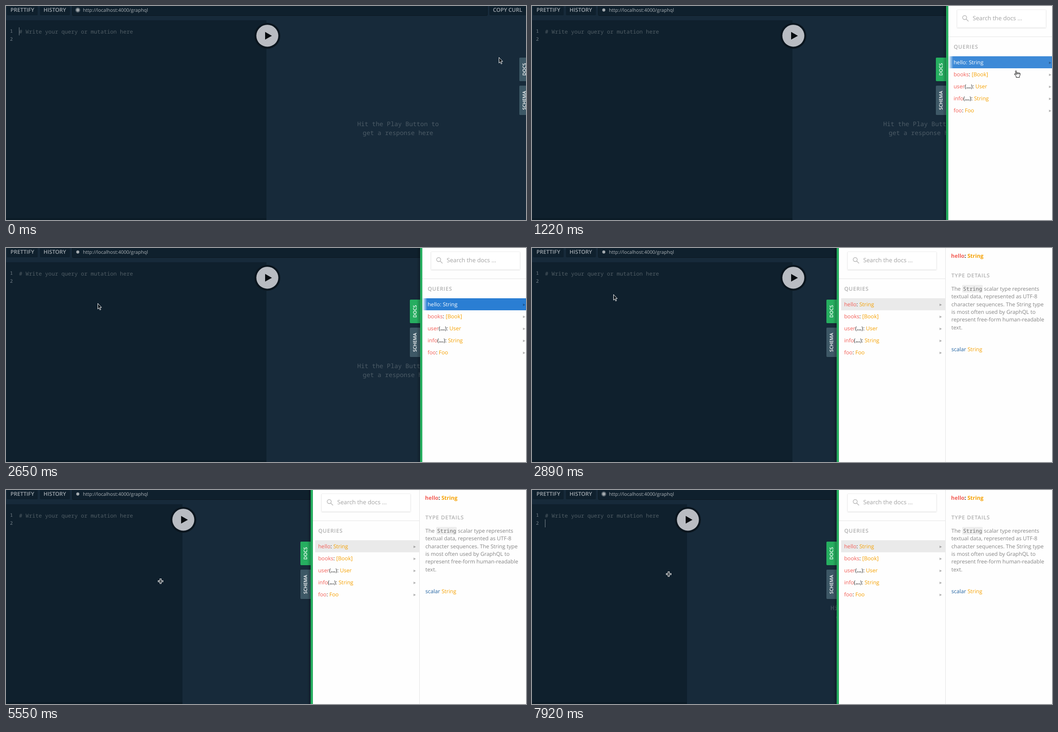
Recreate the animation shown at these times as an HTML page. Size 1164 by 481 pixels, loop 8 s.

```html
<!DOCTYPE html>
<html lang="en">
<head>
<meta charset="utf-8">
<title>Query playground</title>
<style>
  html, body { margin: 0; width: 100%; height: 100%; overflow: hidden; background: #172a3a; }
  svg { display: block; width: 1164px; height: 481px; font: 12.1px "Open Sans", sans-serif; text-rendering: geometricPrecision; }
  text { white-space: pre; }
  .button { font-weight: 600; fill: #a2a9b0; }
  .mono { font-family: "Noto Sans Mono", monospace; }
  .tab { font-size: 10.5px; font-weight: 600; fill: #fff; text-anchor: middle; }
  .heading { font-size: 12px; font-weight: 600; letter-spacing: .75px; fill: #b0b0b0; }
  .field { fill: #f25c54; }
  .type { fill: #f5a000; }
  .mark { fill: #222; }
  .active tspan { fill: #fff; }
</style>
</head>
<body>
<svg viewBox="0 0 1164 481">
  <defs>
    <linearGradient id="blue">
      <stop offset="0" stop-color="#2a7ed3" stop-opacity="0"/>
      <stop offset=".045" stop-color="#2a7ed3"/>
    </linearGradient>
    <linearGradient id="shade">
      <stop offset="0" stop-opacity="0"/>
      <stop offset="1" stop-opacity=".25"/>
    </linearGradient>
    <filter id="shadow" x="-20%" y="-20%" width="140%" height="150%">
      <feDropShadow dx="0" dy="1" stdDeviation="1" flood-opacity=".1"/>
    </filter>
  </defs>

  <rect width="1164" height="481" fill="#172a3a"/>
  <g fill="#0f202d">
    <rect x="2" y="-5" width="69" height="26" rx="2"/>
    <rect x="76" y="-5" width="67" height="26" rx="2"/>
    <rect x="1082" y="-5" width="90" height="26" rx="2"/>
    <rect x="148.5" y="-5" width="929" height="26.5" rx="2" stroke="#0a1720"/>
    <rect id="editor" y="32" height="449"/>
  </g>
  <rect id="footer" y="477" height="4" fill="#0b1924" opacity=".7"/>
  <text class="button" x="10" y="13.1">PRETTIFY</text>
  <text class="button" x="84" y="13.1">HISTORY</text>
  <text class="button" x="1090" y="13.1">COPY CURL</text>
  <circle id="ring" cx="160.7" cy="9" r="5.7" fill="#4c5963"/>
  <circle cx="160.7" cy="9" r="3.4" fill="#a3a9ae"/>
  <text x="172.2" y="13.2" font-size="10.7" fill="#adb3b8">http://localhost:4000/graphql</text>

  <g class="mono">
    <text x="9" y="60.3" font-size="10.4" fill="#77838b">1</text>
    <text x="9" y="77.8" font-size="10.4" fill="#77838b">2</text>
    <text x="29.3" y="61.6" font-size="12.15" fill="#505d65"># Write your query or mutation here</text>
    <g id="hint" font-size="13.85" text-anchor="middle" fill="#4c5b66">
      <text y="269.8">Hit the Play Button to</text>
      <text y="289.5">get a response here</text>
    </g>
  </g>
  <rect id="caret" x="29" width="1" height="18" fill="#7f8990"/>

  <g id="play">
    <circle cy="67" r="29" fill="#0a151e"/>
    <circle cy="66.8" r="24.6" fill="#b9bcc2"/>
    <path d="M-5 58.3L10.2 66.9L-5 75.5Z" fill="#070b0f"/>
  </g>

  <g id="panel">
    <g filter="url(#shadow)">
      <rect id="docsTab" x="-23" y="116" width="25" height="53" rx="2"/>
      <rect x="-23" y="179" width="25" height="66" rx="2" fill="#3d5866"/>
    </g>
    <text class="tab" transform="translate(-7.6 142.3) rotate(-90)">DOCS</text>
    <text class="tab" transform="translate(-7.6 212.2) rotate(-90)">SCHEMA</text>
    <rect x="-8" width="8" height="481" fill="url(#shade)"/>
    <rect width="500" height="481" fill="#fefefe"/>
    <rect width="5" height="481" fill="#27ae60"/>

    <g transform="translate(-.5 0)">
      <rect x="25" y="8.5" width="199" height="40" rx="1" fill="#fff" stroke="#eee" filter="url(#shadow)"/>
      <g fill="none" stroke="#b4b4b4" stroke-width="1.4">
        <circle cx="42" cy="26" r="4.5"/>
        <path d="M45.3 29.3L50.5 34.5"/>
      </g>
      <text x="60" y="32.4" font-size="13.15" fill="#a2a2a2">Search the docs ...</text>
      <path d="M5.5 69H244M244 0V481" stroke="#e4e4e4"/>
      <text class="heading" x="17.4" y="95.6">QUERIES</text>
      <rect id="selected" x="10.5" y="113" width="233" height="27" fill="#eaeaea"/>
      <rect id="hover" x="5.5" width="239" height="27" fill="url(#blue)"/>
      <g id="rows"></g>

      <text x="256.6" y="22" font-weight="700"><tspan class="field">hello</tspan><tspan class="mark">: </tspan><tspan class="type">String</tspan></text>
      <text class="heading" x="257.3" y="65.6">TYPE DETAILS</text>
      <rect x="281.5" y="83" width="46" height="17" rx="2" fill="#eee"/>
      <g id="details" fill="#858585" font-size="12.05">
        <text class="mono" x="283.5" y="96" font-size="11.8" fill="#707070">String</text>
        <text x="330" y="96">scalar type represents</text>
      </g>
      <text x="257.3" y="232"><tspan fill="#1f61a0">scalar </tspan><tspan class="type">String</tspan></text>
    </g>
  </g>

  <g id="pointer" stroke-linejoin="round">
    <path id="arrow" d="M.5 .5V13.2L3.3 10.5L5.2 15.2L7.2 14.4L5.3 9.7H9Z" fill="#0c141a" stroke="#fff"/>
    <path id="hand" d="M-2.6 2V-6.2Q-2.6-7.6-3.7-7.6T-4.8-6.2V1L-6.2-.6Q-7.4-1-6.8.6L-3.2 5V7.5H4.2V5.2Q6 2.5 5.8-1.6Q5.2-3 3.8-2.1Q3-3.3 1.6-2.6Q.6-3.6-.6-2.9L-2.6-3M-.6-2.9V.5M1.6-2.6V.5M3.8-2.1V.5" fill="#fff" stroke="#111"/>
    <g id="cross" fill="none">
      <path d="M-6 0H6M0-6V6" stroke="#fff" stroke-width="4"/>
      <path d="M-5.2 0H5.2M0-5.2V5.2" stroke="#0c141a" stroke-width="1.7"/>
    </g>
  </g>
</svg>
<script>
const $ = id => document.getElementById(id);
const set = (id, attrs) => Object.entries(attrs).forEach(([key, value]) => $(id).setAttribute(key, value));
const show = (id, visible) => set(id, { visibility: visible ? "visible" : "hidden" });
const move = (id, x, y = 0) => set(id, { transform: `translate(${x} ${y})` });
const clamp = (value, low, high) => Math.min(high, Math.max(low, value));

const LOOP = 8000;
const OPEN = 1220;    // docs panel slides in
const DETAILS = 2890; // second column appears
const RESIZE = 4000;  // pointer reaches the divider
const DRAG = 4860;    // divider starts to move

// Key points of the pointer path: time, x, y.
const path = [
  [0, 1103, 115], [630, 1154, 146], [930, 1153, 145], [OPEN, 1087, 153],
  [2080, 1022, 141], [2650, 205, 124], [DETAILS, 182, 104], [3520, 644, 246],
  [RESIZE, 580, 217], [DRAG, 577, 212], [5520, 346, 205], [LOOP - 80, 306, 189]
];

function pointerAt(time) {
  const i = path.findLastIndex(([start]) => start <= time);
  const [t0, x0, y0] = path[i];
  const [t1, x1, y1] = path[i + 1] ?? [LOOP, x0, y0];
  const jumps = Math.max(1, Math.round((t1 - t0) / 270));
  const part = Math.floor((time - t0) / (t1 - t0) * jumps) / jumps;
  return [x0 + (x1 - x0) * part, y0 + (y1 - y0) * part];
}

const dots = '(<tspan font-weight="700">...</tspan>)';
$("rows").innerHTML = [
  ["hello", "", "String"], ["books", "", "[Book]"], ["user", dots, "User"],
  ["info", dots, "String"], ["foo", "", "Foo"]
].map(([name, args, type], i) => {
  const y = 131 + 27 * i;
  return `<g><text x="17.2" y="${y}"><tspan class="field">${name}</tspan><tspan class="mark">${args}: </tspan><tspan class="type">${type}</tspan></text>
    <path d="M230.8 ${y - 6}L236 ${y - 3.2}L230.8 ${y - .4}Z" fill="#000" fill-opacity=".3"/></g>`;
}).join("");

$("details").innerHTML += [
  "The", "textual data, represented as UTF-8", "character sequences. The String type",
  "is most often used by GraphQL to", "represent free-form human-readable", "text."
].map((line, i) => `<text x="257.3" y="${96 + 17.3 * i}">${line}</text>`).join("");

function draw(time) {
  const open = time >= OPEN;
  const details = time >= DETAILS;

  // The divider slows down over four jumps.
  const jump = clamp(Math.floor((time - DRAG) / 330), 0, 4);
  const split = 347 + 236 * (1 - jump / 4) ** 2.3;
  const dragging = jump > 0 && jump < 4;
  set("editor", { width: split });
  set("footer", { width: split });
  move("play", split + 2);
  move("hint", (split + 1164) / 2 + 4);
  show("ring", (time + 150) % 2000 < 400);

  const firstLine = !open && time % 640 < 270;
  const secondLine = time >= 3490 && !dragging && (time - 3490) % 990 < 500;
  show("caret", firstLine || secondLine);
  set("caret", { y: firstLine ? 48 : 66 });

  move("panel", open ? (details ? 682 : 927) : 1172);
  set("docsTab", { fill: open ? "#27ae60" : "#3d5866" });
  const row = time >= 1520 && time < 1870 ? 1 : 0;
  const hovering = open && !details;
  show("selected", details);
  show("hover", hovering);
  set("hover", { y: 113 + 27 * row, opacity: time < 2080 ? .91 : 1 });
  [...$("rows").children].forEach((item, i) => item.classList.toggle("active", hovering && i === row));

  const shape = time >= RESIZE ? "cross" : time >= 630 && time < 2350 ? "hand" : "arrow";
  for (const id of ["arrow", "hand", "cross"]) show(id, id === shape);
  move("pointer", ...pointerAt(time));
}

const start = performance.now();
function tick() {
  draw((performance.now() - start) % LOOP);
  requestAnimationFrame(tick);
}
tick();
</script>
</body>
</html>
```
